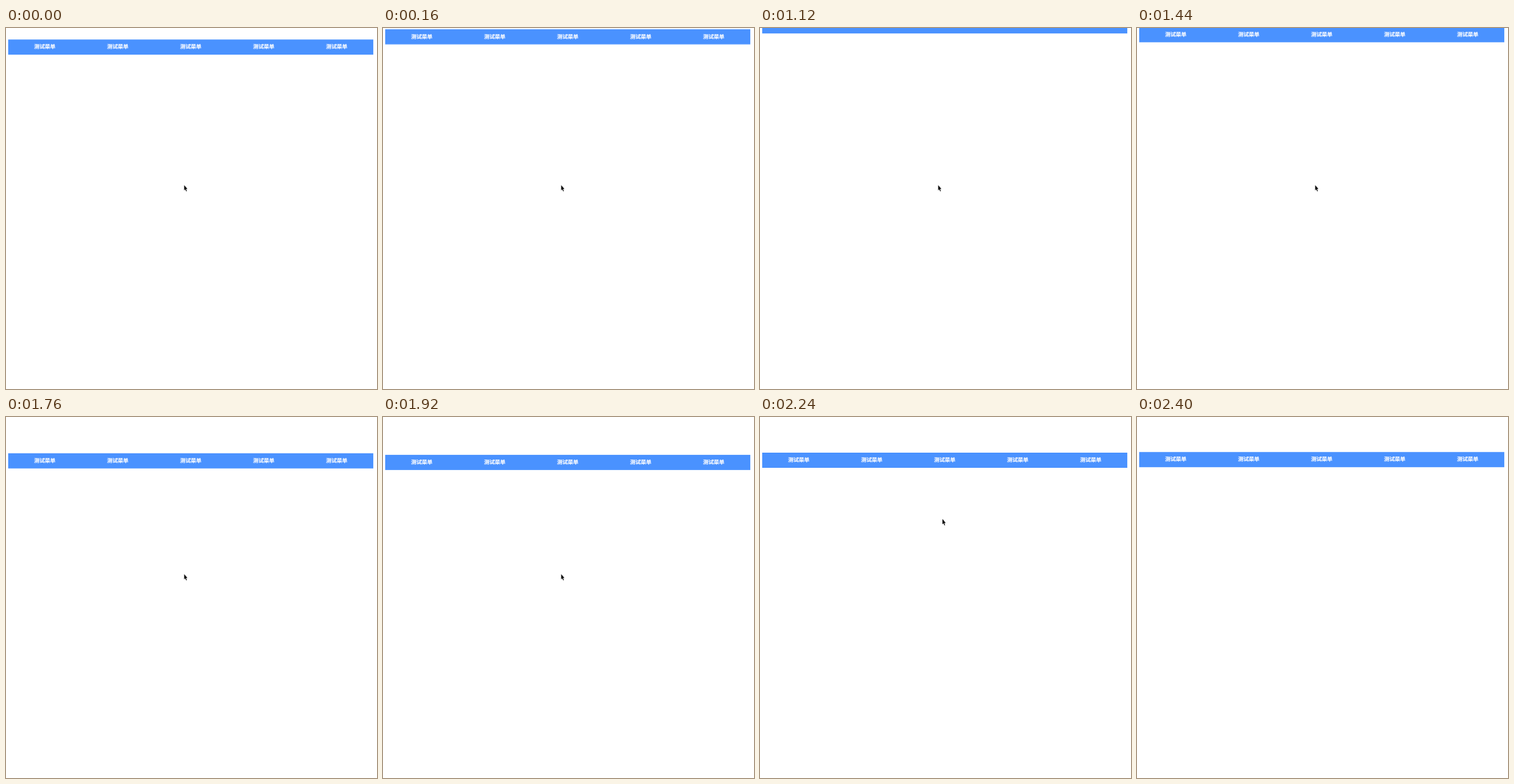
An HTML page that plays this animation: 488x476 px, repeating every 2.72 s.

```html
<!DOCTYPE html>
<html lang="zh-CN">
<head>
<meta charset="utf-8">
<title>Menu</title>
<style>
html, body { margin: 0; width: 100%; height: 100%; overflow: hidden; background: #fff; }
svg { display: block; width: 488px; height: 476px; }
text {
  font: 700 7px "Noto Sans CJK SC", "Noto Sans CJK", sans-serif;
  fill: #fff; stroke: #fff; stroke-width: .12;
  text-anchor: middle; text-rendering: geometricPrecision;
}
</style>
</head>
<body>
<svg viewBox="0 0 488 476">
  <g id="menu"><rect x="2.85" width="480.3" height="20" fill="#4a92ff"/></g>
  <path id="cursor" d="M0 0V6.9L1.5 5.5 2.6 8.3 3.5 7.9 2.4 5.1H4.3Z"/>
</svg>
<script>
const LOOP = 2720, TICK = 160, REST = -1.2;
const menu = document.getElementById('menu');
const cursor = document.getElementById('cursor');

for (let i = 0; i < 5; i++) {
  const label = document.createElementNS('http://www.w3.org/2000/svg', 'text');
  label.setAttribute('x', 50.9 + i * 96);
  label.setAttribute('y', 12.3);
  label.textContent = '测试菜单';
  menu.append(label);
}

// Move between two heights over a time span, then stay; power shapes the pace
function glide(t, start, end, from, to, power = 1) {
  const p = Math.min((t - start) / (end - start), 1);
  return from + (to - from) * p ** power;
}

function barTop(t) {
  if (t < 1120) return glide(t, 0, 480, 15.2, REST, 0.17);     // scrolls up and settles
  if (t < 1760) return glide(t, 1120, 1440, -12.8, REST);      // springs back from the top edge
  if (t < 2240) return glide(t, 1760, 2080, 47.8, 53.3, 1.4);  // pulled down
  return glide(t, 2240, 2400, 47, 46.2);                       // released
}

function place(el, x, y) {
  el.setAttribute('transform', `translate(${x} ${y})`);
}

function draw(time) {
  const t = time - time % TICK;
  place(menu, 0, barTop(t));
  place(cursor, t < 2240 ? 234.4 : 240, t < 2240 ? 207.2 : 134.6);
  cursor.setAttribute('visibility', t < 2400 ? 'visible' : 'hidden');
}

const begin = performance.now();
function tick() {
  draw((performance.now() - begin) % LOOP);
  requestAnimationFrame(tick);
}
tick();
</script>
</body>
</html>
```
